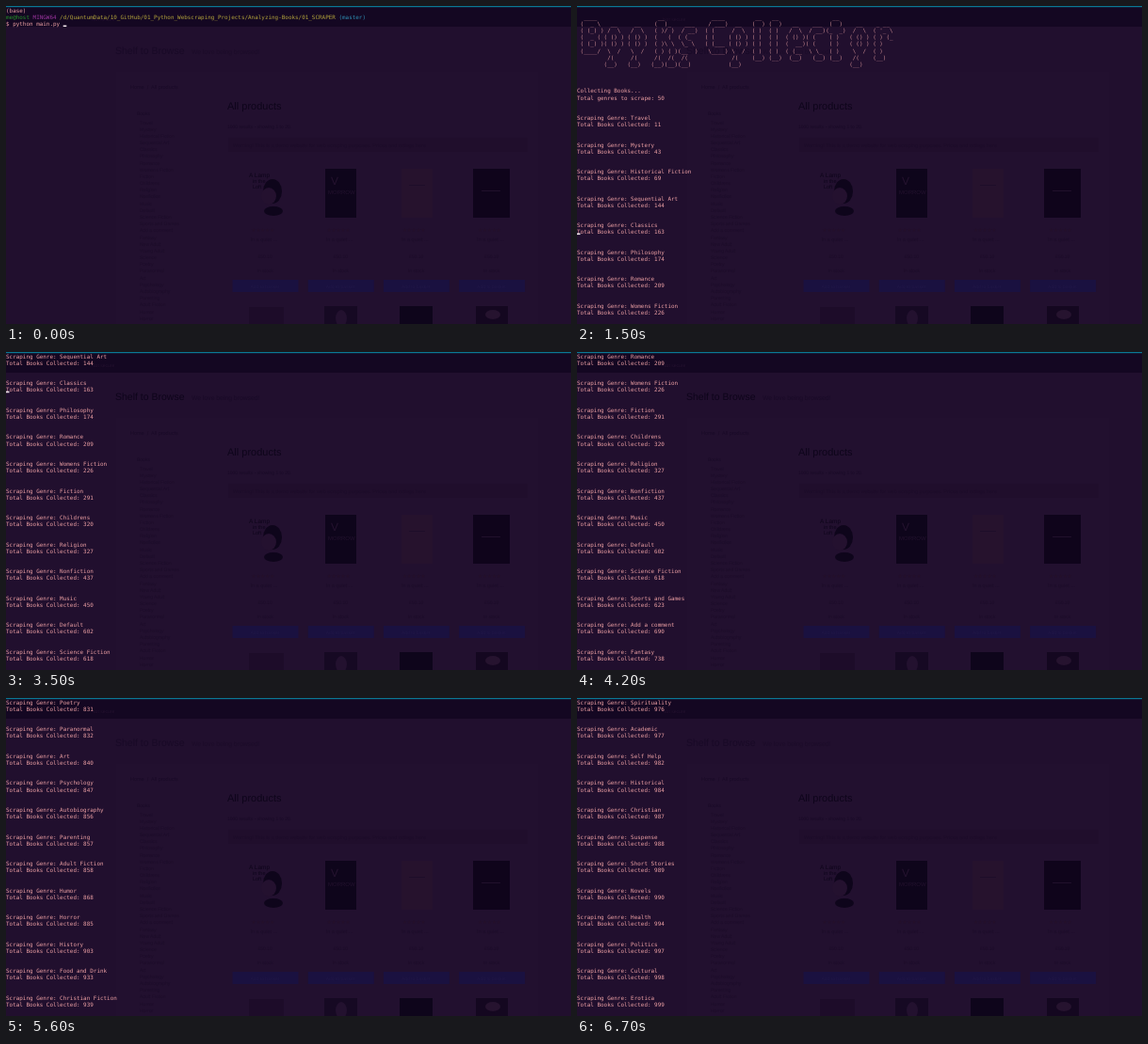
Recreate the animation shown at these times as an HTML page with a canvas. Size 600 px wide and 338 px high, loop 6.8 s.

```html
<!DOCTYPE html>
<html lang="en">
<head>
<meta charset="utf-8">
<title>Book scraper terminal</title>
<style>
html, body { margin: 0; width: 100%; height: 100%; overflow: hidden; background: #210f2e; }
canvas { display: block; width: 600px; height: 338px; }
</style>
</head>
<body>
<canvas width="600" height="338"></canvas>
<script>
const LOOP = 6800, ROW = 7.136, BASELINE = 6.8, COL = 3.57, LAST_ROW = 45;
const MONO = '"DejaVu Sans Mono", monospace', SANS = '"Liberation Sans", sans-serif';
const PINK = '#eda0a4';
const ctx = document.querySelector('canvas').getContext('2d');

// Each entry: time in ms, then the genres that finish at that time with the running total.
const schedule = `300 Travel:11
400 Mystery:43
600 Historical Fiction:69
900 Sequential Art:144
1000 Classics:163
1100 Philosophy:174
1200 Romance:209
1400 Womens Fiction:226
1800 Fiction:291
2000 Childrens:320,Religion:327
2600 Nonfiction:437
2700 Music:450
3400 Default:602
3500 Science Fiction:618
3600 Sports and Games:623
3900 Add a comment:690
4200 Fantasy:738
4300 New Adult:744
4500 Young Adult:798
4600 Science:812
4700 Poetry:831
4800 Paranormal:832
4900 Art:840,Psychology:847
5000 Autobiography:856,Parenting:857
5100 Adult Fiction:858
5200 Humor:868
5300 Horror:885,History:903
5500 Food and Drink:933
5600 Christian Fiction:939
5700 Business:951
5800 Biography:956
5900 Thriller:967,Contemporary:970
6000 Spirituality:976,Academic:977
6100 Self Help:982
6200 Historical:984
6300 Christian:987,Suspense:988
6400 Short Stories:989
6500 Novels:990,Health:994
6600 Politics:997
6700 Cultural:998,Erotica:999`;

const genres = schedule.split('\n').flatMap(line => {
  const [, at, items] = line.match(/^(\d+) (.*)$/);
  return items.split(',').map(item => {
    const [name, total] = item.split(':');
    return { at: +at, name, total };
  });
});

// Banner letters: width, then eight rows separated by "|".
const raw = String.raw;
const glyphs = {
  ' ': [2, ''],
  B: [7, raw` ____|(  _ \|( (_) )|(  _ (|( (_) )|(____/`],
  C: [7, raw`  ____| / ___)|( (|( (|( (___| \____)`],
  o: [7, raw`|  __| /  \|( () )|( () )| \  /| /(|(__)`],
  k: [8, raw`  __| (  )_| ( )/ )| (   (| ( )\ \| ( ) ( )| /(  /(|(__)(__)`],
  s: [6, raw`|  ___| / __)|( (_| \_ \|(__  )| /(|(__)`],
  l: [5, raw` __|(  )|( )|( )|( )|( )|(__)`],
  e: [6, raw`|  __| /  \|( () )|(  __)|( (__| (__)`],
  c: [6, raw`|  ___| / __)|( (|( (| \ \_|  (__)`],
  t: [7, raw`  __| (  )|(_  _)| ( )| ( )| ( )| (__)`],
  r: [6, raw`| _ __|( '_ \|( ) (_|( )|( )|(__)`]
};
const banner = Array.from({ length: 8 }, (_, row) => ' ' + [...'Books Collector'].map(ch => {
  const [width, art] = glyphs[ch];
  return (art.split('|')[row] || '').padEnd(width);
}).join(''));

// Text is set large and scaled down so that its advances stay fractional.
function text(str, x, y, size, color, family = SANS) {
  ctx.save();
  ctx.translate(x, y);
  ctx.scale(.1, .1);
  ctx.font = `${size * 10}px ${family}`;
  ctx.textRendering = 'geometricPrecision';
  ctx.fillStyle = color;
  ctx.fillText(str, 0, 0);
  ctx.restore();
}

function rect(x, y, w, h, color) {
  ctx.fillStyle = color;
  ctx.fillRect(x, y, w, h);
}

function ellipse(x, y, rx, ry, color) {
  ctx.fillStyle = color;
  ctx.beginPath();
  ctx.ellipse(x, y, rx, ry, 0, 0, 7);
  ctx.fill();
}

function drawPage(t) {
  const dim = '#190a27', ink = '#0e051b', faint = '#1c0c29';
  const clear = t >= 2600 && t < 4500;
  rect(0, 0, 600, 338, '#210f2e');
  rect(117, 70, 448, 268, '#22102f');
  rect(0, 0, 600, 22, '#140722');
  rect(0, 0, 600, 1.2, '#0b7894');
  text('Not secure', 91, 16, 5, '#24122f');

  text('Shelf to Browse', 116, 51, 10.5, clear ? ink : dim);
  text('We love being browsed!', 197, 51, 6.8, clear ? dim : faint);
  text('Home  /  All products', 132, 88, 5.5, dim);
  text('All products', 235, 110, 11, ink);
  text('1000 results - showing 1 to 20.', 235, 130, 5, dim);
  rect(236, 140, 318, 15, '#200e2c');
  text('Warning! This is a demo website for web scraping purposes. Prices and ratings here', 241, 150, 5.5, faint);

  text('Books', 139, 116, 5, dim);
  for (let i = 0; i < 30; i++) text(genres[i].name, 142, 125.5 + i * 7.18, 5, faint);

  text('A Lamp', 258, 182, 6.5, ink);
  text('in the', 262, 188, 5.5, ink);
  text('Loft', 262, 194, 5.5, ink);
  ellipse(283, 197, 10, 13, ink);
  ellipse(279, 202, 8, 9, '#24112f');
  ellipse(284, 218, 10, 5, ink);
  rect(339, 173, 33, 52, ink);
  text('V', 345, 190, 12, '#25132f');
  text('MORROW', 342, 200, 6, '#23122e');
  rect(420, 173, 33, 52, '#26122d');
  rect(428, 190, 17, 1, '#1e0d29');
  rect(496, 173, 39, 52, '#0f041b');
  rect(505, 196, 20, 1, '#21102b');

  for (let i = 0; i < 4; i++) {
    const x = 240.5 + i * 80.2;
    text('★★★★★', x + 20, 240, 5.5, '#24102a');
    text('In a quiet ...', x + 19, 250, 5.5, faint);
    text('In stock', x + 26, 283, 5, faint);
    text('£50.10', x + 27, 268, 5, faint);
    rect(x, 291, 70, 13, '#1a1140');
    text('Add to basket', x + 19, 299.5, 5, '#211747');
  }
  rect(258, 320, 37, 18, '#1d0c29');
  rect(338, 319, 35, 19, '#160923');
  ellipse(356, 332, 6, 9, '#23112f');
  rect(418, 319, 35, 19, ink);
  rect(499, 319, 34, 19, '#140720');
  ellipse(517, 328, 8, 5, '#26132f');
}

function drawTerminal(t) {
  const lines = [];
  const put = (row, str, color = PINK, col = 0) => lines.push({ row, str, color, col });
  put(0, '(base)');
  put(1, 'me@host', '#259327');
  put(1, 'MINGW64', '#9a359e', 8);
  put(1, '/d/QuantumData/10_GitHub/01_Python_Webscraping_Projects/Analyzing-Books/01_SCRAPER', '#b3a43c', 16);
  put(1, '(master)', '#2f8fb4', 99);
  put(2, '$ python main.py');

  if (t >= 100) {
    banner.forEach((str, i) => put(7 + i, str, '#c98a91'));
    put(18, 'Collecting Books...');
    put(19, 'Total genres to scrape: 50');
  }
  let last = 19;
  genres.filter(g => g.at <= t).forEach((g, i) => {
    const row = 22 + i * 4;
    put(row, 'Scraping Genre: ' + g.name);
    put(row + 1, 'Total Books Collected: ' + g.total);
    last = row + 1;
  });

  const scroll = Math.max(0, last - LAST_ROW);
  for (const { row, str, color, col } of lines) {
    const y = (row - scroll) * ROW + BASELINE;
    if (y > 0 && y < 345) text(str, col * COL, y, 5.93, color, MONO);
  }

  if (t < 100) rect(60.7, 20.5, 3.6, 1.5, '#f4e9ee');
  if (t >= 1000) rect(0, (39 - scroll) * ROW + 6, 3.5, 1.6, '#f4e9ee');
}

function frame(now) {
  const t = now % LOOP;
  drawPage(t);
  drawTerminal(t);
  requestAnimationFrame(frame);
}
requestAnimationFrame(frame);
</script>
</body>
</html>
```
